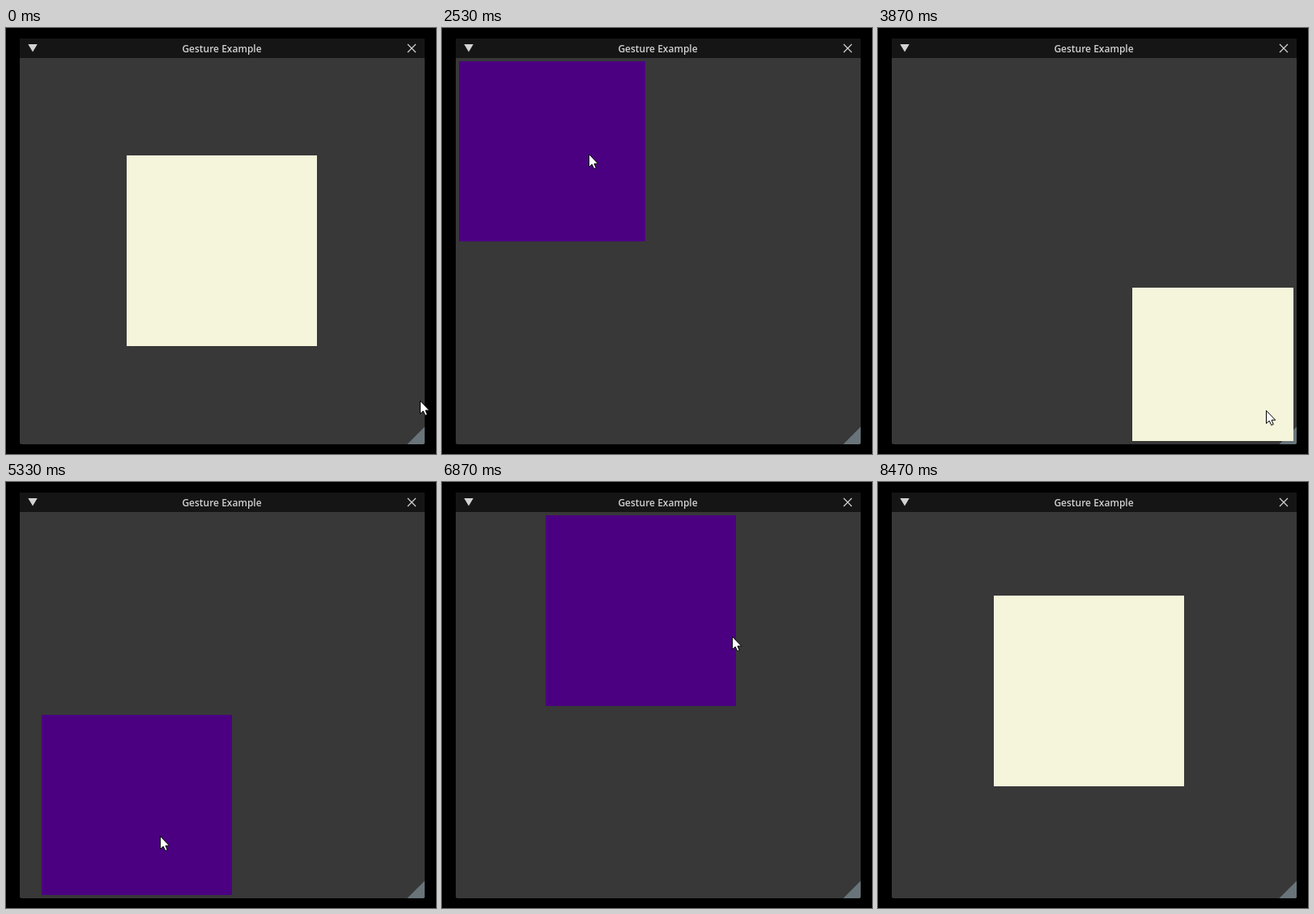
Recreate the animation shown at these times as an HTML page. Size 531x525 px, loop 8870 ms.

```html
<!DOCTYPE html>
<html lang="en">
<head>
<meta charset="utf-8">
<title>Gesture Example</title>
<style>
  html, body { margin: 0; width: 100%; height: 100%; overflow: hidden; background: #000; }
  svg { display: block; width: 100%; height: 100%; }
  text { font: 600 12px "Open Sans", "Noto Sans", sans-serif; }
</style>
</head>
<body>
<svg viewBox="0 0 531 525">
  <defs>
    <clipPath id="content"><rect x="21" y="41" width="492" height="468"/></clipPath>
  </defs>
  <rect width="531" height="525" fill="#000"/>
  <rect x="17" y="13" width="500" height="500" rx="2" fill="#383838"/>
  <path d="M17 37V15q0-2 2-2H515q2 0 2 2V37Z" fill="#151515"/>
  <path d="M27.3 20H38.7L33 29.6Z" fill="#d3d3d3"/>
  <text x="266.5" y="30" text-anchor="middle" fill="#d0d0d0">Gesture Example</text>
  <path d="M496 20L506 30M506 20L496 30" stroke="#d3d3d3" stroke-width="1.2"/>
  <path d="M517 491.5V511q0 2-2 2H495.5Z" fill="#687479"/>
  <g clip-path="url(#content)"><rect id="box" width="235" height="235"/></g>
  <path id="cursor" d="M.5 .5V16.4L4.2 13.1L6.8 18.5L9.3 17.4L7 12.2H11.7Z"
        fill="#fff" stroke="#000" stroke-linejoin="round"/>
</svg>
<script>
const LOOP = 8870, FPS = 15, SIZE = 235;
const GRIP = [165, 151];

// A stroke sets off at a tick from where the last one ended,
// then passes a few turning points [tick, x, y].
let rest = [511, 459];
function stroke(tick, ...turns) {
  const pts = [[tick, ...rest], ...turns];
  rest = pts[pts.length - 1].slice(1);
  return pts;
}

const strokes = [
  stroke(4, [10, 314, 308]),
  stroke(21, [31, 196, 446], [37, 181, 179], [38, 181, 155], [46, 506, 170]),
  stroke(49, [54, 479, 471]),
  stroke(75, [79, 209, 438], [80, 190, 436],
    [86, 225, 195], [93, 594, 267], [97, 380, 450], [100, 212, 350],
    [102, 293, 192], [103, 358, 190],
    [106, 590, 310], [109, 330, 455], [111, 180, 340], [113, 308, 291]),
  stroke(124, [128, 114, 649])
];

// Cubic Hermite through the points, at rest at both ends.
function along(pts, k) {
  const last = pts.length - 1;
  if (k <= pts[0][0]) return pts[0].slice(1);
  if (k >= pts[last][0]) return pts[last].slice(1);
  const i = pts.findIndex(p => p[0] > k) - 1;
  const a = pts[i], b = pts[i + 1], h = b[0] - a[0], u = (k - a[0]) / h;
  const slope = (j, c) => j === 0 || j === last ? 0 :
    (pts[j + 1][c] - pts[j - 1][c]) / (pts[j + 1][0] - pts[j - 1][0]);
  const s = u * u * (3 - 2 * u);
  return [1, 2].map(c => Math.round(
    a[c] + (b[c] - a[c]) * s +
    h * u * (1 - u) * ((1 - u) * slope(i, c) - u * slope(i + 1, c))));
}

function pointerAt(k) {
  return along(strokes.filter(s => s[0][0] <= k).pop() || strokes[0], k);
}

// The box trails the pointer by one tick, from the first grab to the last release.
function boxAt(k) {
  const tick = Math.max(16, Math.min(k - 1, 120));
  return pointerAt(tick).map((v, c) => v - GRIP[c]);
}

const box = document.getElementById("box");
const cursor = document.getElementById("cursor");
const within = (v, lo, hi) => v >= lo && v <= hi;

function draw(ms) {
  const k = Math.floor((ms % LOOP + 5) * FPS / 1000);
  const held = within(k, 16, 57) || within(k, 69, 120);
  const [bx, by] = boxAt(k), [cx, cy] = pointerAt(k);
  box.setAttribute("x", bx);
  box.setAttribute("y", by);
  box.setAttribute("fill", held ? "indigo" : "beige");
  cursor.setAttribute("transform", `translate(${cx} ${cy})`);
  const inside = within(cx, 17, 517) && within(cy, 13, 513);
  cursor.setAttribute("visibility", inside ? "visible" : "hidden");
}

const begin = performance.now();
function tick() {
  draw(performance.now() - begin);
  requestAnimationFrame(tick);
}
tick();
</script>
</body>
</html>
```
